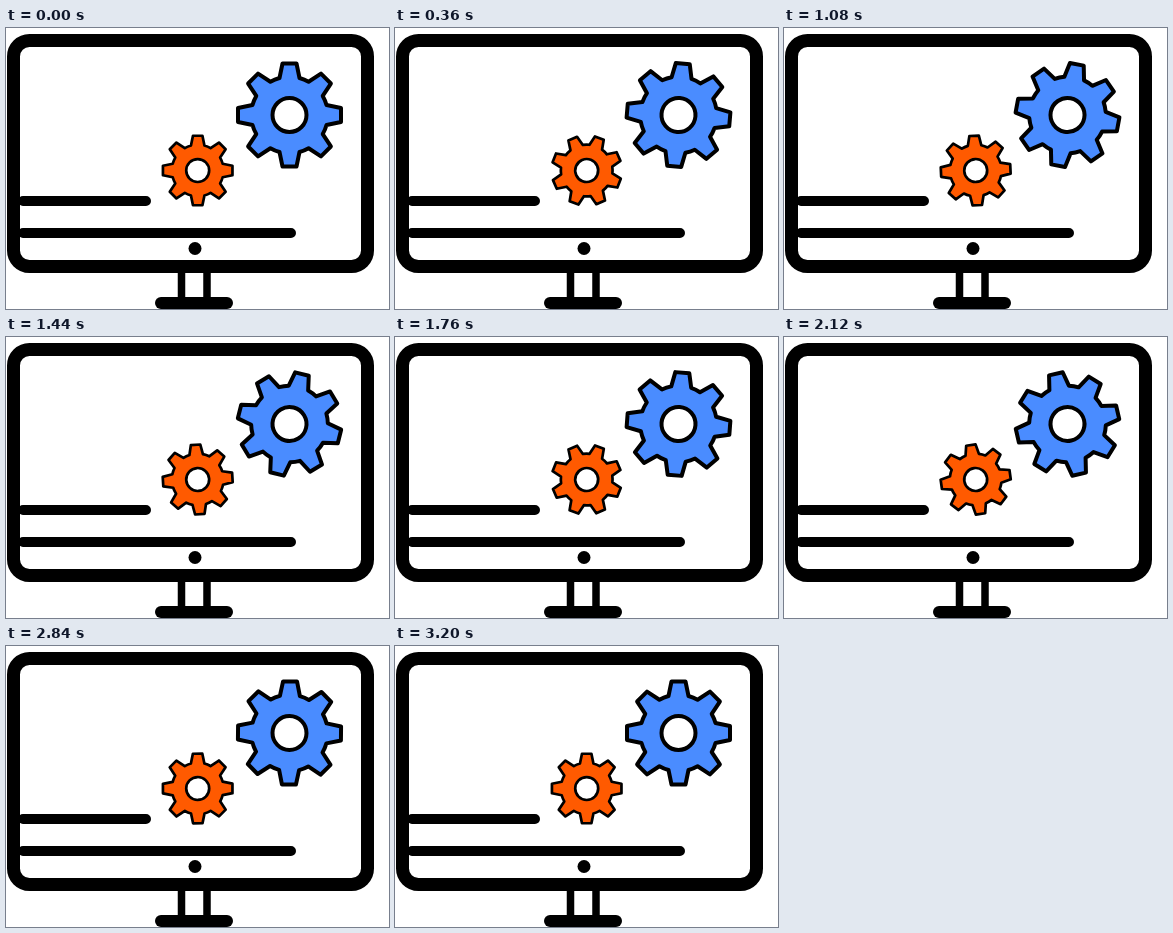
An HTML page for the animation above (3.3 s loop, 383 px wide and 281 px high).

```html
<!DOCTYPE html>
<html lang="en">
<head>
<meta charset="utf-8">
<title>Gears on a monitor</title>
<style>
  html, body { margin: 0; width: 100%; height: 100%; overflow: hidden; background: #fff; }
  svg { display: block; width: 383px; height: 281px; }
  .line { fill: none; stroke: #000; stroke-linecap: round; }
  .gear { stroke: #000; stroke-width: 4; stroke-linejoin: round; }
</style>
</head>
<body>
<svg viewBox="0 0 383 281">
  <rect class="line" x="7.5" y="12.5" width="354" height="226" rx="16" stroke-width="13"/>
  <path class="line" stroke-width="10" d="M17 173H140M17 205H285"/>
  <circle cx="189" cy="220.5" r="6.5"/>
  <path class="line" stroke-width="7.5" stroke-linecap="butt" d="M175.5 242V272M201 242V272"/>
  <path class="line" stroke-width="12" d="M155 275H221"/>

  <defs>
    <g id="gear">
      <path id="teeth"/>
      <circle r="17" fill="#fff"/>
    </g>
  </defs>
  <g transform="translate(283.5 87)">
    <use id="blue" class="gear" href="#gear" fill="#4a8cff"/>
  </g>
  <g transform="translate(191.7 142.5) scale(.675)">
    <use id="orange" class="gear" href="#gear" fill="#ff5a00"/>
  </g>
</svg>
<script>
  const LOOP = 3300, STEP = 40, LAST = 3200;
  const el = id => document.getElementById(id);

  // One tooth is a trapezoid; eight of them are joined by arcs.
  function gearPath() {
    const tooth = [[-10, -37], [-7, -51.5], [7, -51.5], [10, -37]];
    let d = '';
    for (let i = 0; i < 8; i++) {
      const a = i * Math.PI / 4, c = Math.cos(a), s = Math.sin(a);
      tooth.forEach(([x, y], j) => {
        const p = (x * c - y * s).toFixed(2) + ' ' + (x * s + y * c).toFixed(2);
        d += (j ? 'L' : i ? 'A38.3 38.3 0 0 1 ' : 'M') + p;
      });
    }
    return d + 'A38.3 38.3 0 0 1 -10 -37Z';
  }
  el('teeth').setAttribute('d', gearPath());

  // Time in ms and the cube root of the turn still to go.
  const keys = [[0, 1], [720, .768], [1080, .636], [1760, .403], [2120, .281], [2480, .152], [LAST, 0]];

  function remaining(t) {
    const i = Math.max(1, keys.findIndex(k => k[0] >= t));
    const [t0, v0] = keys[i - 1], [t1, v1] = keys[i];
    return (v0 + (v1 - v0) * (t - t0) / (t1 - t0)) ** 3;
  }

  function draw(now) {
    const t = Math.min(LAST, Math.floor(now % LOOP / STEP) * STEP);
    const left = remaining(t);
    el('blue').setAttribute('transform', `rotate(${1440 * left})`);
    el('orange').setAttribute('transform', `rotate(${-360 * left})`);
  }

  const start = performance.now();
  function tick() {
    draw(performance.now() - start);
    requestAnimationFrame(tick);
  }
  tick();
</script>
</body>
</html>
```
